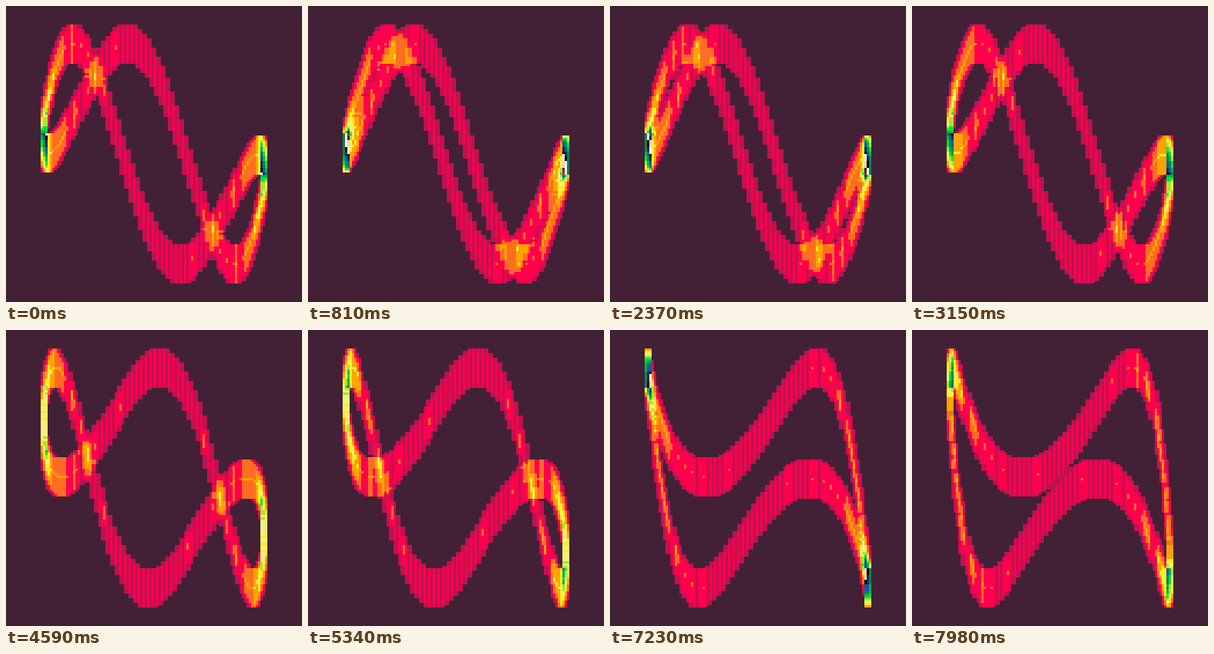
Animation of 384x384 px, one loop 8 s. Source, as a matplotlib script:

```python
import numpy as np
import matplotlib.pyplot as plt
from matplotlib.animation import FuncAnimation
from matplotlib.colors import to_rgb

GRID = 128
MID, AMP = 64, 48
POINTS = 150
LOOP, TICK, STEP = 8000, 20, 30   # ms
TURN = 0.3282                     # degrees per step
START = 181.2 - 54 * TURN

PALETTE = np.array([to_rgb(c) for c in (
    "#422136", "#be1250", "#ff004d", "#ff6c24",
    "#ffa300", "#ffec27", "#f3ef7d", "#a8e72e",
    "#00e436", "#00b543", "#008751", "#065ab5",
    "#1d2b53", "#000000", "#fff1e8", "#ffccaa")])

U = 2 * np.pi * np.arange(POINTS) / POINTS


def to_cell(v):
    # the tiny offset keeps exact multiples from flickering when floored
    return np.floor(MID + AMP * v + 1e-9).astype(int)


Y = to_cell(-np.sin(np.pi * np.sin(U)))


def heat(step):
    """Count how many brush stamps cover each cell."""
    phase = np.radians(START + TURN * step)
    xs = to_cell(np.cos(U - np.pi / 2 + phase))
    cells = np.zeros((GRID, GRID), int)
    for i, (x, y) in enumerate(zip(xs, Y)):
        cells[y - 8:y + 9, x - 1:x + 2] += 1
        # close neighbours leave a brighter mark along the centre line
        x0, y0 = xs[i - 1], Y[i - 1]
        if abs(x - x0) == 1:
            top, low = min(y, y0), max(y, y0)
            inner = min(x, x0, key=lambda c: abs(c - MID))
            cells[top:max(low, top + 1), inner] += 1
    return PALETTE[cells % len(PALETTE)]


fig = plt.figure(figsize=(3.84, 3.84), dpi=100, facecolor=PALETTE[0])
ax = fig.add_axes([0, 0, 1, 1])
ax.axis("off")
image = ax.imshow(heat(0), interpolation="nearest", aspect="auto")


def draw(k):
    image.set_data(heat(k * TICK // STEP))
    return [image]


anim = FuncAnimation(fig, draw, frames=LOOP // TICK, interval=TICK,
                     init_func=lambda: draw(0), repeat=True,
                     repeat_delay=0, blit=False)
plt.show()
```
